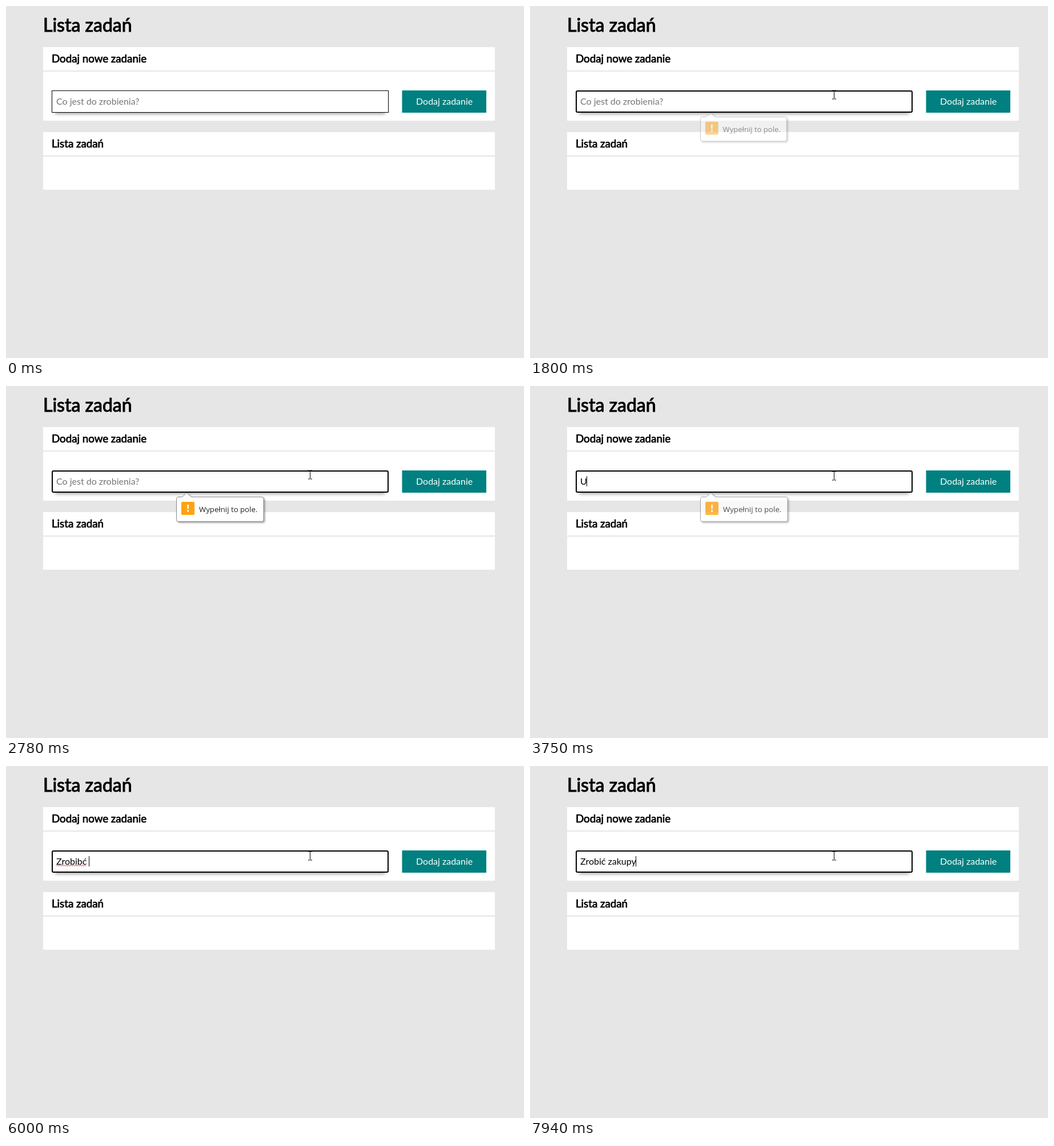
An HTML page that plays this animation: 907 px wide and 617 px high, repeating every 8 s.

```html
<!DOCTYPE html>
<html lang="pl">
<head>
<meta charset="utf-8">
<title>Lista zadań</title>
<style>
  html, body { margin: 0; width: 100%; height: 100%; overflow: hidden; background: #e6e6e6; }
  svg { display: block; position: absolute; left: 0; top: 0; }
  text { font: 16px Lato, sans-serif; white-space: pre; }
  /* Regular weight thickened by a thin stroke, like synthetic bold */
  .title { font-size: 32px; stroke: #000; stroke-width: 1.04px; }
  .head { font-size: 18.72px; stroke: #000; stroke-width: .71px; }
  .tip { font: 13.2px "Open Sans", "Noto Sans", sans-serif; fill: #222; }
  #field {
    position: absolute; left: 80px; top: 148px; width: 590px; height: 39px;
    box-sizing: border-box; background: #fff; border: 1px solid #000;
    box-shadow: 0 8px 6px -6px rgba(0, 0, 0, .4);
  }
  #field.focus { border-width: 2px; border-radius: 3px; }
</style>
</head>
<body>
<svg width="907" height="617">
  <text class="title" x="65" y="45">Lista zadań</text>
  <path fill="#fff" d="M65 72h791v41H65zM65 115h791v86H65zM65 221h791v41H65zM65 264h791v58H65z"/>
  <text class="head" x="80" y="99">Dodaj nowe zadanie</text>
  <text class="head" x="80" y="248">Lista zadań</text>
  <rect x="693.5" y="148" width="147.5" height="39" fill="#008080"/>
  <text x="718" y="173" fill="#fff">Dodaj zadanie</text>
</svg>
<div id="field"></div>
<svg width="907" height="617">
  <text id="value" x="88" y="173"></text>
  <path id="squiggle" fill="none" stroke="#e5201c" stroke-width="1"/>
  <rect id="caret" y="158" width="1" height="18"/>
  <g id="bubble">
    <path d="M301.5 194.5H308.5L316.5 187.5L324.5 194.5H448Q451 194.5 451 197.5V234.5Q451 237.5 448 237.5H301.5Q298.5 237.5 298.5 234.5V197.5Q298.5 194.5 301.5 194.5Z"
          fill="#fff" stroke="#8c8c8c" style="filter:drop-shadow(2px 2px 1.5px rgba(0,0,0,.35))"/>
    <rect x="307" y="203" width="23" height="23" rx="2" fill="#ffa30f"/>
    <path d="M317 208h3.2l-.5 7.6h-2.2zM317.1 217.5h3v3h-3z" fill="#fff"/>
    <text class="tip" x="338" y="221">Wypełnij to pole.</text>
  </g>
  <circle id="halo" cx="530" cy="154" r="12" fill="#ff0" fill-opacity=".5"/>
  <path id="arrow" d="M.5 .5V16.2L4.2 12.7L6.7 18.5L9.2 17.4L6.8 11.8H11.8Z" fill="#fff" stroke="#000"/>
  <path id="beam" fill="none" stroke="#000" d="M-3 -7H0M1 -7H4M-3 8H0M1 8H4M.5 -6.5V7.5"/>
</svg>
<script>
const LOOP = 8000, LEFT = 88;
const HINT = "Co jest do zrobienia?";
const $ = id => document.getElementById(id);

// [time, typed text, caret visible, misspelling marked]
const typing = [
  [0, "", 0], [880, "", 1], [1400, "", 0], [1930, "", 1], [2500, "", 0], [2990, "", 1],
  [3620, "", 0], [3690, "U", 1], [4210, "U", 0], [4340, "", 1], [4930, "Z", 1],
  [5080, "Zr", 1], [5150, "Zro", 1], [5280, "Zrobi", 1], [5340, "Zrobib", 1],
  [5540, "Zrobibć", 1], [5610, "Zrobibć ", 1, 1], [5740, "Zrobibć z", 1, 1],
  [6000, "Zrobibć ", 1, 1], [6150, "Zrobib", 1], [6280, "Zrobi", 1], [6800, "Zrobi", 0],
  [7130, "Zrobić", 1], [7330, "Zrobić ", 1], [7440, "Zrobić z", 1], [7540, "Zrobić za", 1],
  [7640, "Zrobić zak", 1], [7740, "Zrobić zaku", 1], [7840, "Zrobić zakup", 1],
  [7940, "Zrobić zakupy", 1]
];

// [time, shape, x, y]
const pointer = [
  [0, ""], [130, "arrow", 604, 376], [200, "arrow", 535, 251], [410, "arrow", 534, 228],
  [480, "arrow", 532, 190], [550, "beam", 532, 155], [2920, "beam", 537, 152],
  [3020, "beam", 535, 155], [3160, "beam", 532, 157]
];

const at = (steps, t) => steps.findLast(s => s[0] <= t);
const ramp = (t, from, to) => Math.min(1, Math.max(0, (t - from) / (to - from)));
const show = (el, on) => { el.style.display = on ? "" : "none"; };

const pen = document.createElement("canvas").getContext("2d");
function textWidth(s) {
  pen.font = "16px Lato, sans-serif";
  return pen.measureText(s).width;
}

function zigzag(width) {
  let d = `M${LEFT} 175.5`;
  for (let x = 2, up = true; x <= width; x += 2, up = !up) d += `L${LEFT + x} ${up ? 173.5 : 175.5}`;
  return d;
}

function drawField(t) {
  const [, text, caretOn, marked] = at(typing, t);
  $("field").className = t >= 880 ? "focus" : "";
  $("value").textContent = text || HINT;
  $("value").setAttribute("fill", text ? "#000" : "#757575");
  $("caret").setAttribute("x", Math.floor(LEFT + textWidth(text)));
  show($("caret"), caretOn);
  show($("squiggle"), marked);
  if (marked) $("squiggle").setAttribute("d", zigzag(textWidth("Zrobibć")));
}

function drawBubble(t) {
  const fadeIn = 1 - (1 - ramp(t, 1700, 2080)) ** 2;
  const scale = .985 + .015 * ramp(t, 1730, 2780) ** .5;
  const alpha = fadeIn * (1 - ramp(t, 3690, 3950));
  show($("bubble"), t >= 1730 && alpha > 0);
  $("bubble").setAttribute("opacity", alpha);
  $("bubble").setAttribute("transform", `translate(299 187) scale(${scale}) translate(-299 -187)`);
}

function drawPointer(t) {
  const [, shape, x, y] = at(pointer, t);
  for (const id of ["arrow", "beam"]) {
    show($(id), id === shape);
    if (id === shape) $(id).setAttribute("transform", `translate(${x} ${y})`);
  }
  show($("halo"), t >= 810 && t < 940);
}

const start = performance.now();
function frame() {
  const t = (performance.now() - start) % LOOP;
  drawField(t);
  drawBubble(t);
  drawPointer(t);
  requestAnimationFrame(frame);
}
frame();
</script>
</body>
</html>
```
